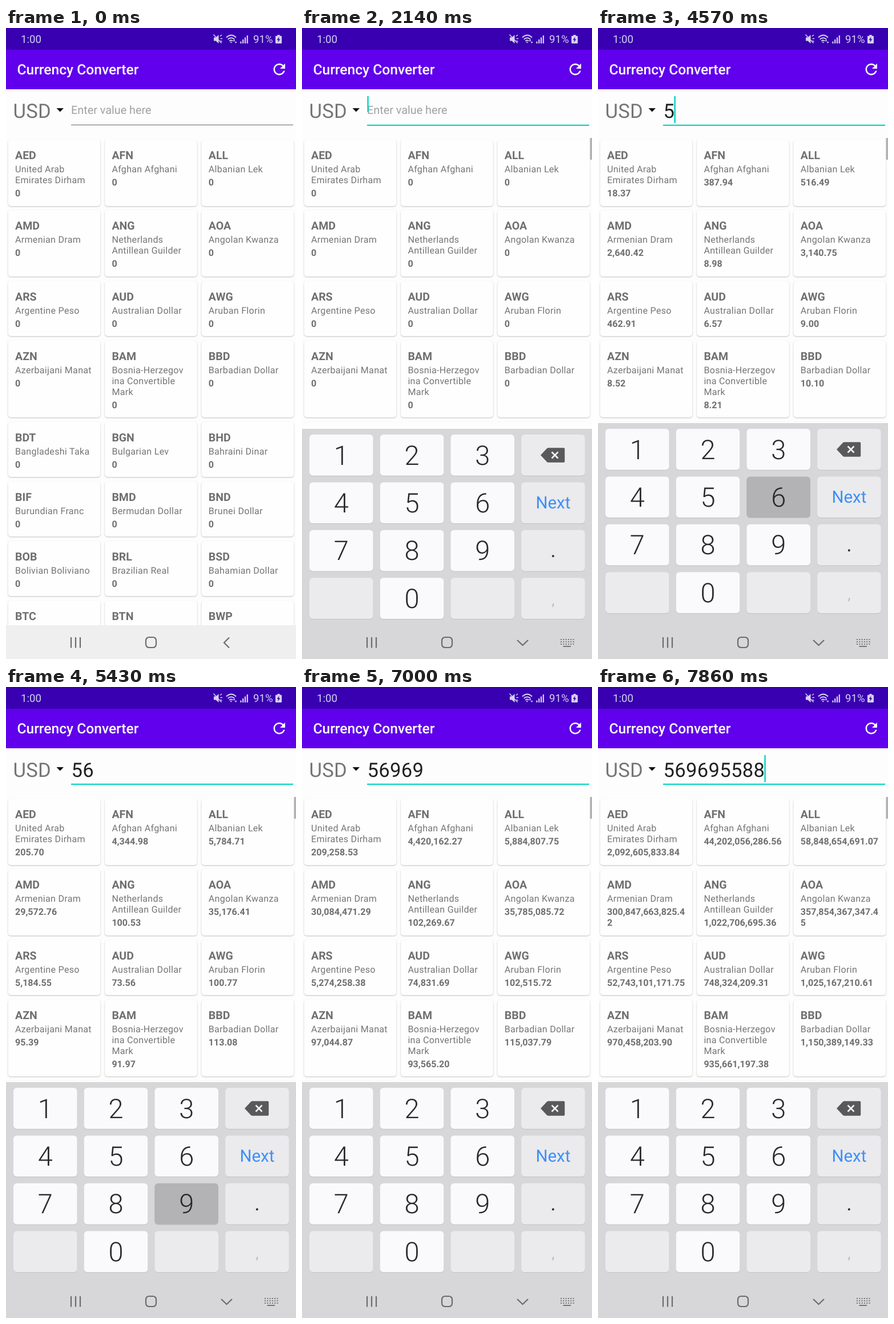
An HTML page for the animation above (8 s loop, 508 by 1102 pixels).

```html
<!DOCTYPE html>
<html lang="en">
<head>
<meta charset="utf-8">
<title>Currency Converter</title>
<style>
  html, body { margin: 0; width: 100%; height: 100%; overflow: hidden; background: #fdfdfd; }
  svg { display: block; width: 100%; height: 100%; }
  text { font-family: Roboto, "Noto Sans", sans-serif; text-rendering: geometricPrecision; }
  .card { fill: #fefefe; filter: drop-shadow(0 1px 1px rgba(0, 0, 0, .24)); }
  .code { font-size: 19.5px; font-weight: 700; fill: #6f6f6f; }
  .name { font-size: 16.07px; letter-spacing: .286px; fill: #757575; }
  .value { font-size: 16.07px; font-weight: 700; fill: #6f6f6f; }
  .big { font-size: 34.6px; letter-spacing: .32px; }
  .status { font-size: 18.6px; fill: #d8d0f0; }
  .key { filter: drop-shadow(0 1px .5px rgba(0, 0, 0, .1)); }
  .digit { font-size: 47px; font-weight: 300; fill: #29292b; text-anchor: middle; }
  .line { fill: none; stroke: #6c6c6e; stroke-width: 2.2; }
</style>
</head>
<body>
<svg id="stage" viewBox="0 0 508 1102" preserveAspectRatio="none"></svg>
<script>
const NS = 'http://www.w3.org/2000/svg';
const stage = document.getElementById('stage');
const LOOP = 8000;
const TYPED = 569695588;

function add(parent, tag, attrs = {}, text) {
  const el = document.createElementNS(NS, tag);
  for (const k in attrs) el.setAttribute(k, attrs[k]);
  if (text !== undefined) el.textContent = text;
  parent.appendChild(el);
  return el;
}
const group = parent => add(parent, 'g');
const rect = (parent, x, y, width, height, fill, extra) =>
  add(parent, 'rect', { x, y, width, height, fill, ...extra });
const label = (parent, x, y, cls, text, extra) =>
  add(parent, 'text', { x, y, class: cls, ...extra }, text);
const path = (parent, d, extra) => add(parent, 'path', { d, ...extra });
const show = (el, on) => el.setAttribute('visibility', on ? 'visible' : 'hidden');

// Each card: code | name lines | amount for the complete typed number
const rows = [
  [195, 116, 'AED|United Arab/Emirates Dirham|2092605833.84', 'AFN|Afghan Afghani|44202056286.56', 'ALL|Albanian Lek|58848654691.07'],
  [318, 116, 'AMD|Armenian Dram|300847663825.42', 'ANG|Netherlands/Antillean Guilder|1022706695.36', 'AOA|Angolan Kwanza|357854367347.45'],
  [442, 96, 'ARS|Argentine Peso|52743101171.75', 'AUD|Australian Dollar|748324209.31', 'AWG|Aruban Florin|1025167210.61'],
  [546, 134, 'AZN|Azerbaijani Manat|970458203.90', 'BAM|Bosnia-Herzegov/ina Convertible/Mark|935661197.38', 'BBD|Barbadian Dollar|1150389149.33'],
  [688, 96, 'BDT|Bangladeshi Taka', 'BGN|Bulgarian Lev', 'BHD|Bahraini Dinar'],
  [792, 96, 'BIF|Burundian Franc', 'BMD|Bermudan Dollar', 'BND|Brunei Dollar'],
  [896, 96, 'BOB|Bolivian Boliviano', 'BRL|Brazilian Real', 'BSD|Bahamian Dollar'],
  [1000, 96, 'BTC|', 'BTN|', 'BWP|']
];

rect(stage, 0, 0, 508, 1102, '#fdfdfd');
const amounts = [];
for (const [top, height, ...cards] of rows) {
  cards.forEach((card, col) => {
    const [code, name, amount] = card.split('|');
    const left = 3.7 + col * 169.4, x = left + 12.3;
    const lines = name.split('/');
    rect(stage, left, top, 161.6, height, '', { rx: 5, class: 'card' });
    label(stage, x, top + 33.5, 'code', code);
    lines.forEach((line, i) => label(stage, x, top + 57.3 + i * 19, 'name', line));
    const y = top + 61 + lines.length * 19;
    const first = label(stage, x, y, 'value', '0');
    if (amount) {
      const rest = label(stage, x, y + 19, 'value', '');
      amounts.push({ full: +amount, first, rest });
    }
  });
}
const cover = rect(stage, 0, 690, 508, 353, '#fdfdfd');
const scrollbar = rect(stage, 504.5, 192, 3.5, 38, '#b2b2b2');

// Input row
label(stage, 12.5, 157, 'big', 'USD', { fill: '#757575' });
path(stage, 'M88.5 140h12.5l-6.25 6.5z', { fill: '#111' });
const hint = label(stage, 114, 150, '', 'Enter value here', { 'font-size': 19.8, fill: '#a0a0a0' });
const entry = label(stage, 114.6, 157, 'big', '', { fill: '#202020' });
const underline = rect(stage, 114, 168.7, 389, 1.2, '#7a7a7a');
const caret = rect(stage, 114, 119, 2.6, 47, '#12d5c4');

// Status and title bars
rect(stage, 0, 0, 508, 38, '#3800b1');
rect(stage, 0, 38, 508, 69, '#6000ec');
label(stage, 26, 26, 'status', '1:00');
label(stage, 433, 26, 'status', '91%');
label(stage, 19.5, 81, '', 'Currency Converter', { 'font-size': 24.6, 'font-weight': 500, fill: '#fff' });
path(stage, 'M17.65 6.35C16.2 4.9 14.21 4 12 4c-4.42 0-7.99 3.58-7.99 8s3.57 8 7.99 8c3.73 0 6.84-2.55 7.73-6h-2.08c-.82 2.33-3.04 4-5.65 4-3.31 0-6-2.69-6-6s2.69-6 6-6c1.66 0 3.14.69 4.22 1.78L13 11h7V4z',
  { fill: '#fff', transform: 'translate(463.5 57) scale(1.27)' });
const ink = '#d8d0f0';
path(stage, 'M364 16.5h3.5l5-4.5v15l-5-4.5h-3.5z', { fill: ink });
path(stage, 'M363.5 11.5l14 15M375 14.5l3-2.5M375.5 18.5h3.5M375.5 22l3 2', { stroke: ink, 'stroke-width': 1.5 });
path(stage, 'M386 16.5q8.5-8 17 0M388.7 19.7q5.8-5 11.6 0M391.3 22.7q3.2-2.5 6 0', { fill: 'none', stroke: ink, 'stroke-width': 1.8 });
path(stage, 'M392 24.2h4.5l-2.2 2.4zM397.5 23l2-3 2 3zM400.5 24l2 3 2-3z', { fill: ink });
for (let i = 0; i < 4; i++) rect(stage, 410.3 + i * 3.8, 23.5 - i * 3.5, 2.2, 3.5 + i * 3.5, ink);
path(stage, 'M475.3 12h4.4v1.7h2.3q1 0 1 1v11.3q0 1-1 1h-9q-1 0-1-1v-11.3q0-1 1-1h2.3z', { fill: ink });
path(stage, 'M478.5 15.5l-4 5.3h2.5l-.8 4.2 4.2-5.6h-2.6z', { fill: '#3800b1' });

// Keyboard
const board = group(stage);
rect(board, 0, 690, 508, 412, '#d7d6d8');
const keys = {};
const keyRows = ['123<', '456N', '789.', ' 0 ,'];
keyRows.forEach((row, r) => [...row].forEach((ch, c) => {
  const x = 13 + c * 123.7, y = 700 + r * 83.4, mid = x + 55.8;
  const isDigit = ch >= '0' && ch <= '9';
  const box = rect(board, x, y, 111.6, 71.7, isDigit ? '#faf9fb' : '#ebeaec', { rx: 6, class: 'key' });
  if (isDigit) {
    keys[ch] = box;
    label(board, mid, y + 52.5, 'digit', ch);
  } else if (ch === '<') {
    path(board, 'M418 736l11-11.7q1-1.1 2.5-1.1h27q1.7 0 1.7 1.7v22.2q0 1.7-1.7 1.7h-27q-1.5 0-2.5-1.1z', { fill: '#59595b' });
    path(board, 'M437.5 730.5l11 11m0-11l-11 11', { stroke: '#f4f4f5', 'stroke-width': 2.6 });
  } else if (ch === 'N') {
    label(board, mid, y + 46, '', 'Next', { 'font-size': 29.5, fill: '#3c90f7', 'text-anchor': 'middle' });
  } else if (ch === '.') {
    label(board, mid, y + 47, '', '.', { 'font-size': 36, fill: '#333', 'text-anchor': 'middle' });
  } else if (ch === ',') {
    label(board, mid, y + 47.5, '', ',', { 'font-size': 25, fill: '#b9b8bb', 'text-anchor': 'middle' });
  }
}));

// Navigation bar
const navBack = rect(stage, 0, 1043, 508, 59, '#f0eff0');
path(stage, 'M114 1064v18.5M122 1064v18.5M130 1064v18.5', { class: 'line' });
rect(stage, 245, 1064, 18, 18, 'none', { rx: 5.5, class: 'line' });
const back = path(stage, 'M391 1064.5l-9 9 9 9', { class: 'line' });
const down = group(stage);
path(down, 'M377 1069l9.5 9 9.5-9', { class: 'line' });
for (let r = 0; r < 3; r++)
  for (let c = 0; c < 6; c++) rect(down, 453 + c * 4.3, 1067 + r * 4, 2, 2, '#77777a');
rect(down, 457.5, 1079, 13.5, 2, '#77777a');

// Timeline: [start, ...]; the latest entry that has begun applies
const FOCUS = 1710, OPEN = 2000;
const slide = [[OPEN, 120], [2140, 10], [2290, 2], [2430, 0]];
const typing = [[0, 0], [3570, 1], [5000, 2], [5710, 3], [6140, 4], [6290, 5], [7140, 6], [7430, 7], [7710, 8], [7860, 9]];
const caretOff = [[0, FOCUS], [2860, 3570], [3860, 4430], [5430, 5710], [6710, 7140]];
const presses = [['6', 4570, 4710], ['9', 5290, 5570], ['5', 6860, 7000], ['5', 7290, 7430], ['8', 7570, 7710]];

const latest = (track, t) => track.reduce((v, [at, x]) => (t >= at ? x : v), track[0][1]);
const within = (t, from, to) => t >= from && t < to;
const money = v => v.toLocaleString('en-US', { minimumFractionDigits: 2, maximumFractionDigits: 2 });

let shownCount = -1;
function type(count) {
  if (count === shownCount) return;
  shownCount = count;
  const digits = String(TYPED).slice(0, count);
  entry.textContent = digits;
  show(hint, !count);
  for (const { full, first, rest } of amounts) {
    const text = count ? money(full * digits / TYPED) : '0';
    first.textContent = text.slice(0, 17);
    rest.textContent = text.slice(17);
  }
}

function draw(t) {
  const focused = t >= FOCUS, open = t >= OPEN;
  const count = latest(typing, t);
  type(count);

  underline.setAttribute('fill', focused ? '#12d5c4' : '#7a7a7a');
  underline.setAttribute('height', focused ? 2.3 : 1.2);
  caret.setAttribute('x', count ? 113.6 + count * 19.74 : 114.2);
  caret.setAttribute('height', count ? 47 : 27.5);
  show(caret, !caretOff.some(([a, b]) => within(t, a, b)));
  show(scrollbar, focused);

  show(cover, open);
  show(board, open);
  board.setAttribute('transform', `translate(0 ${latest(slide, t)})`);
  for (const k in keys) {
    const held = presses.some(([key, a, b]) => key === k && within(t, a, b));
    keys[k].setAttribute('fill', held ? '#b3b2b4' : '#faf9fb');
  }
  navBack.setAttribute('fill', open ? '#d7d6d8' : '#f0eff0');
  show(back, !open);
  show(down, open);
}

const begin = performance.now();
function tick() {
  draw((performance.now() - begin) % LOOP);
  requestAnimationFrame(tick);
}
tick();
</script>
</body>
</html>
```
